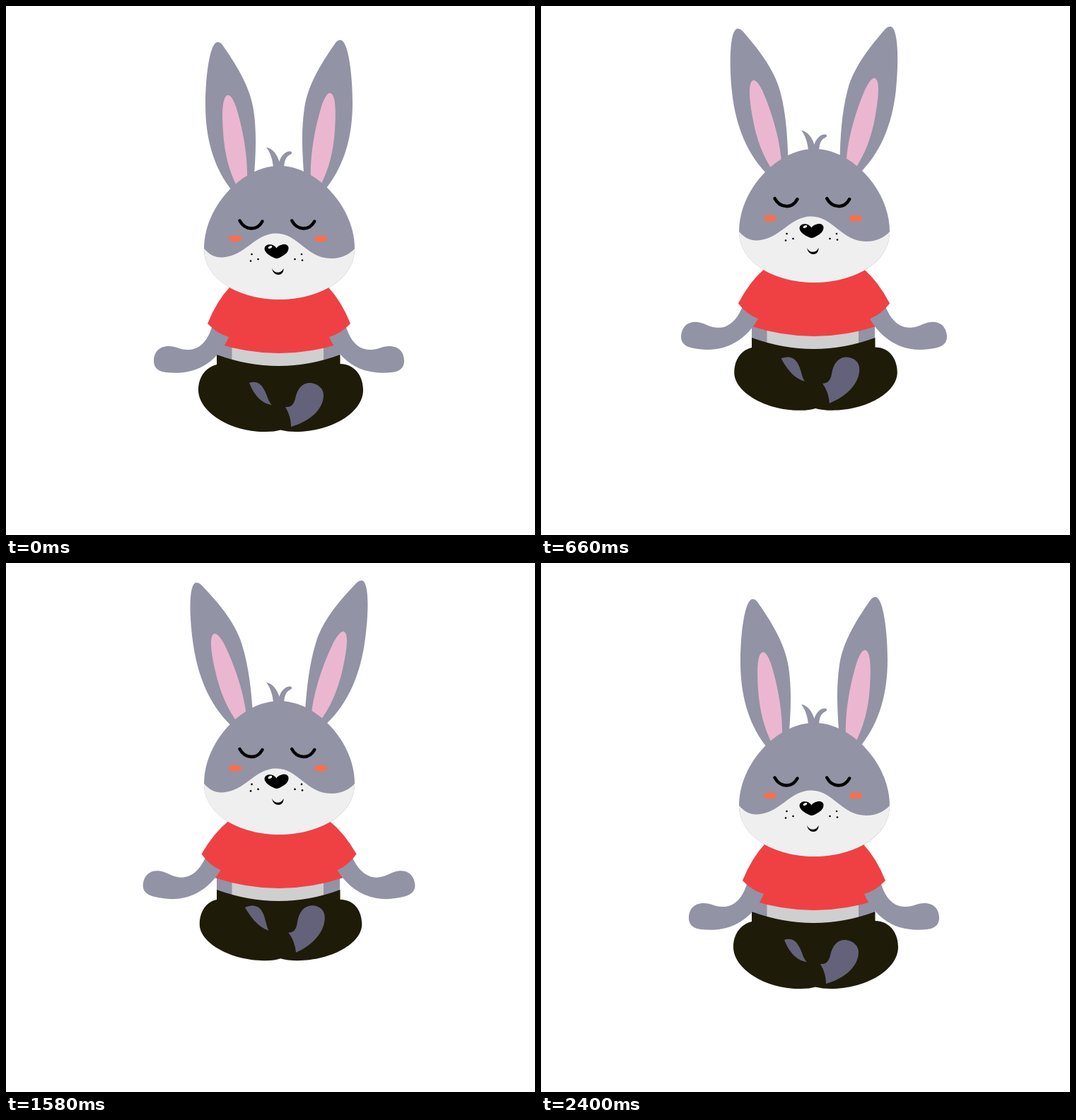
Write an HTML page that moves like this. It is 748x748 px and loops after 2440 ms.

```html
<!DOCTYPE html>
<html lang="en">
<head>
<meta charset="utf-8">
<title>Meditating rabbit</title>
<style>
  html, body { margin: 0; height: 100%; overflow: hidden; background: #fff; }
  svg { display: block; width: 100%; height: 100%; }
  .fur { fill: #9293a5; }
  .shirt { fill: #ef4143; }
  .pants { fill: #1e1b08; }
  .foot { fill: #64627a; }
  .pink { fill: #ebb7d0; }
  .muzzle { fill: #efefef; }
  .cheek { fill: #f5704f; }
  .lid { fill: none; stroke: #000; stroke-width: 4.5; stroke-linecap: round; }
</style>
</head>
<body>
<svg viewBox="0 0 748 748">
  <g id="rabbit">
    <path class="fur" d="M298 465H472V512H298Z"/>
    <path fill="#cfcfcf" d="M319.500 465H449V515H319.500Z"/>
    <path class="shirt" d="M316 396H456L472 466L477 476Q386 506 295 476L300 466Z"/>
    <path class="pants" d="M298 493Q386 525 472.500 493V530L386 545L298 530Z"/>
    <path class="pants" id="legs"/>
    <path class="foot" id="smallFoot"/>
    <path class="foot" id="bigFoot"/>

    <g id="arm">
      <path class="fur" d="M296 440L290 457C284 475 272 487 256 486C246 486 240 481 230 481C216 481 209 490 209 502C209 512 216 517 226 518C252 521 278 516 299 493Q309 482 315 468L330 440Z"/>
      <path class="shirt" d="M316 398Q298 417 285 449Q298 463 315 468L345 440V390L328 388Z"/>
    </g>
    <use href="#arm" transform="matrix(-1 0 0 1 772 0)"/>

    <g id="ear">
      <path class="fur" d="M299 51C288 52 282 100 282 140C282 190 295 232 322 264L350 250C353 215 355 180 350 147C345 112 322 78 306 55Q303 51 299 51Z"/>
      <path class="pink" d="M314 126C306 127 305 150 307 178C309 210 316 235 328 258L341 245C342 210 334 170 325 142Q319 126 314 126Z"/>
    </g>
    <use href="#ear" transform="matrix(-1 0 0 1 772 -3)"/>

    <path class="fur" d="M368 200C378 201 384 212 386.500 220C389 211 396 205 402 205.500Q406 207 403 209.500C395 213 394 219 393 228H378C377 218 374 207 368 200Z"/>
    <path class="fur" d="M386.500 226C334 226 280 284 280 343C280 388 332 415 386.500 415S493 388 493 343C493 284 439 226 386.500 226Z"/>
    <path class="muzzle" d="M280 343C288 352 296 356 306 355.500C338 354 352 321.500 382 321.500C413 321.500 425 357 460 357C474 357 486 351 493 343C493 388 441 415 386.500 415S280 388 280 343Z"/>

    <g id="cheeks" class="cheek">
      <ellipse cx="324" cy="329" rx="9.500" ry="4.600"/>
      <ellipse cx="445" cy="329" rx="9.500" ry="4.600"/>
    </g>
    <g id="eyes" class="lid">
      <path id="eye" d="M330.500 303.500C338 317.500 355 318.500 362.500 304.500"/>
      <use href="#eye" x="73.700"/>
    </g>
    <g id="nose">
      <path d="M382.500 342.500C386 336.500 399 334 399.500 342C400 350 390 354 386.500 356Q382.500 358 379 356C374 354 365.500 349 365.500 343C366 336 378 335 382.500 342.500Z"/>
      <ellipse cx="373.500" cy="341" rx="3" ry="1.700" fill="#fff" transform="rotate(-25 373.500 341)"/>
      <path d="M376 371C379 378.500 389 379 392.500 371C393 383 378 383 376 371Z"/>
      <circle cx="347.500" cy="351" r="1.300"/>
      <circle cx="356.500" cy="358" r="1.300"/>
      <circle cx="346" cy="360.500" r="1.300"/>
      <circle cx="418" cy="351" r="1.300"/>
      <circle cx="408.500" cy="358" r="1.300"/>
      <circle cx="419" cy="359.500" r="1.300"/>
    </g>
  </g>
</svg>
<script>
const LOOP = 2440, HALF = 1200;
const $ = id => document.getElementById(id);
const move = (id, value) => $(id).setAttribute('transform', value);

// Lower and raised poses of the parts that bend, relative to the body
const poses = {
  legs: [
    'M298 507C282 511 272 525 272 543C272 575 320 603 367 602Q380 602 388 599.5Q398 602 410 602C460 602 505 575 505 543C505 522 492 506 472 506L386 540Z',
    'M298 507C283 510 274 524 274 542C274 568 320 593 367 592Q380 592 388 589Q398 592 413 592C460 592 503 568 503 542C503 521 491 507 472 507L386 540Z'
  ],
  bigFoot: [
    'M395 567C404 568 407 562 409 555C412 540 420 532 431 533C442 534 449 542 449 550C449 572 427 588 403 595Q403 580 395 567Z',
    'M400 552C408 552 411 546 412 539C414 522 422 513 434 513C445 514 451 520 451 530C451 551 433 570 411 580Q409 563 400 552Z'
  ],
  smallFoot: [
    'M344 533C352 530 360 533 364 541C370 550 370 559 376 564C360 562 350 548 344 533Z',
    'M337 516C346 512 355 512 361 520C367 529 367 542 371 549C356 544 346 530 337 516Z'
  ]
};

function mix([from, to], k) {
  const ends = to.match(/[\d.]+/g);
  let i = 0;
  return from.replace(/[\d.]+/g, n => (+n + (ends[i++] - n) * k).toFixed(2) + ' ');
}

// Up and down again, cubic ease in and out each way
function rise(t) {
  const x = Math.max(0, 1 - Math.abs(1 - t / HALF));
  return x < 0.5 ? 4 * x ** 3 : 1 - 4 * (1 - x) ** 3;
}

function draw(now) {
  const t = now % LOOP;
  const lift = rise(t + 14), bend = rise(t - 10);
  move('rabbit', `translate(0 ${-36.2 * lift})`);
  move('eyes', `translate(0 ${-11 * lift})`);
  move('nose', `translate(0 ${-8 * bend})`);
  move('cheeks', `translate(0 ${-8.6 * rise(t - 40)})`);
  move('ear', `rotate(${-10 * bend} 335 253)`);
  move('arm', `rotate(${9 * bend} 328 384)`);
  for (const id in poses) $(id).setAttribute('d', mix(poses[id], bend));
}

const start = performance.now();
function tick() {
  draw(performance.now() - start);
  requestAnimationFrame(tick);
}
tick();
</script>
</body>
</html>
```
